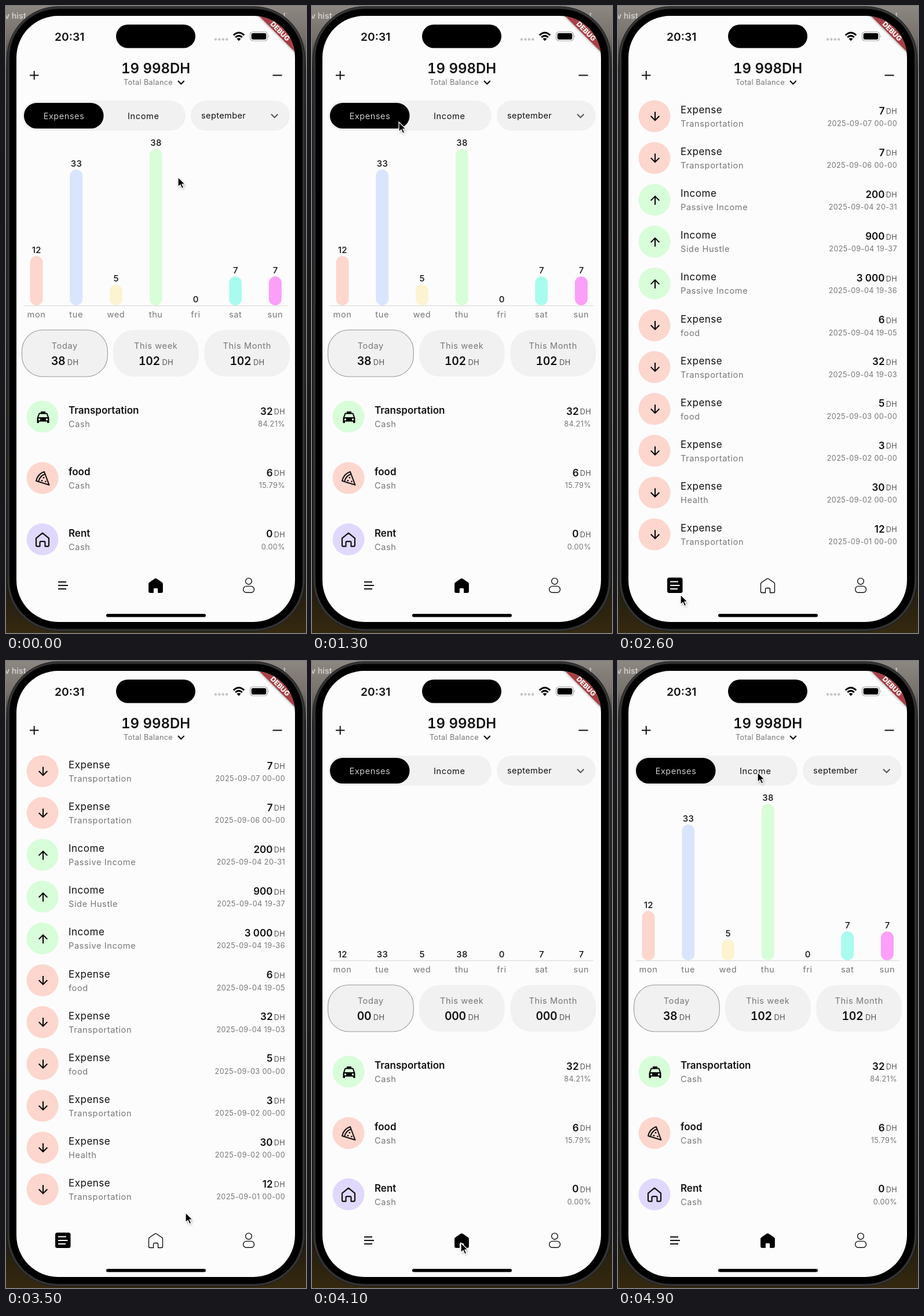
These frames come from a looping animation (518 px wide and 1081 px high, 5000 ms). An HTML page:

```html
<!DOCTYPE html>
<html lang="en">
<head>
<meta charset="utf-8">
<title>Budget app</title>
<style>
html, body { margin: 0; width: 100%; height: 100%; overflow: hidden; background: #1c1a18; }
svg { display: block; width: 100%; height: 100%; font-family: Inter, Roboto, sans-serif; }
text { white-space: pre; }
.line { fill: none; stroke: #111; stroke-width: 2; stroke-linejoin: round; }
.tab { font-variant-numeric: tabular-nums; }
</style>
</head>
<body>
<svg viewBox="0 0 518 1081">
  <defs>
    <linearGradient id="back" x2="0" y2="1">
      <stop offset="0" stop-color="#8d8782"/>
      <stop offset=".05" stop-color="#77706b"/>
      <stop offset=".1" stop-color="#2b2826"/>
      <stop offset=".9" stop-color="#1b1912"/>
      <stop offset="1" stop-color="#35290f"/>
    </linearGradient>
    <clipPath id="screen"><rect x="18" y="17" width="481" height="1045" rx="72"/></clipPath>
    <filter id="soft" x="-50%" y="-50%" width="200%" height="200%"><feGaussianBlur stdDeviation="2"/></filter>
  </defs>
  <rect width="518" height="1081" fill="url(#back)"/>
  <text x="-2" y="22" font-size="14" font-weight="600" fill="#d2cdca">v hist</text>
  <text x="479" y="21" font-size="13" fill="#d2cdca">t</text>
  <rect x="2" y="1" width="514" height="1077" rx="88" fill="#353535" stroke="#191919"/>
  <rect x="6" y="5" width="506" height="1069" rx="84" stroke="#151515"/>
  <g clip-path="url(#screen)">
    <rect x="18" y="17" width="481" height="1045" fill="#fcfcfc"/>
    <g id="header"></g>
    <g id="home"></g>
    <g id="history"></g>
    <rect x="173" y="1048" width="172" height="5.4" rx="2.7"/>
    <g transform="translate(473.5 43.5) rotate(45)">
      <rect x="-49" y="-7.2" width="98" height="14.4" opacity=".5" filter="url(#soft)"/>
      <rect x="-49" y="-7.2" width="98" height="14.4" fill="#a93f44"/>
      <text y="4.4" text-anchor="middle" font-size="12" font-weight="800" fill="#fff">DEBUG</text>
    </g>
  </g>
  <g id="cursor">
    <path d="M0 0V17L4 13.3 6.8 19.6 9.8 18.3 7 12.2H12.4Z" opacity=".35" transform="translate(1 2)" filter="url(#soft)"/>
    <path d="M0 0V17L4 13.3 6.8 19.6 9.8 18.3 7 12.2H12.4Z" stroke="#fff" stroke-width="1.3"/>
  </g>
</svg>
<script>
const $ = id => document.getElementById(id);
const GRAY = '#777', DARK = '#111', SOFT = '#f1f1f1';
const RED = '#fdd6cd', GREEN = '#d8fdd9', LILAC = '#e1d8fd';

// o: fill, weight, spacing, anchor, extra attributes
const text = (s, x, y, size, o = {}) =>
  `<text x="${x}" y="${y}" font-size="${size}" fill="${o.fill || DARK}" font-weight="${o.weight || 400}"
    letter-spacing="${o.ls ?? 0.6}" text-anchor="${o.anchor || 'start'}" ${o.more || ''}>${s}</text>`;
const mid = (s, x, y, size, o) => text(s, x, y, size, { ...o, anchor: 'middle' });
const end = (s, x, y, size, o) => text(s, x, y, size, { ...o, anchor: 'end' });
const box = (x, y, w, h, r, fill, more = '') =>
  `<rect x="${x}" y="${y}" width="${w}" height="${h}" rx="${r}" fill="${fill}" ${more}/>`;
const line = (d, more = '') => `<path class="line" d="${d}" ${more}/>`;
const at = (x, y, s) => `<g transform="translate(${x} ${y})">${s}</g>`;

const arrow = 'M8 0L6.6-1.4 1 4.2V-8H-1V4.2L-6.6-1.4-8 0 0 8Z';
const icons = {
  down: `<path d="${arrow}"/>`,
  up: `<path d="${arrow}" transform="scale(1 -1)"/>`,
  taxi: `<path fill-rule="evenodd" d="M-4-9.5H4V-7H6Q7.3-7 7.8-5.6L10.5 2V9.5Q10.5 10.5 9.5 10.5H8Q7 10.5 7 9.5V8H-7V9.5Q-7 10.5-8 10.5H-9.5Q-10.5 10.5-10.5 9.5V2L-7.8-5.6Q-7.3-7-6-7H-4ZM-6-5L-7.8 0.4H7.8L6-5ZM-6.5 2.6a1.7 1.7 0 1 0 .01 0M6.5 2.6a1.7 1.7 0 1 0 .01 0"/>`,
  pizza: line('M-12 4.5Q-9-8 2-11.3L10.5 11.5ZM-8 5.6Q-5.5-4.5 3.6-7.3') +
    '<circle cx="1" cy="-1" r="1.3"/><circle cx="4.5" cy="5.5" r="1.3"/><circle cx="-2" cy="4" r="1.3"/>',
  house: line('M-12-2.5L-1-11.5 10-2.5V9.5Q10 11.5 8 11.5H3.5V5Q3.5 3 1.5 3H-3.5Q-5.5 3-5.5 5V11.5H-10Q-12 11.5-12 9.5Z', 'style="stroke-width:2.2"')
};

function row(y, icon, color, title, sub, amount, note, bold) {
  return `<circle cx="63" cy="${y}" r="27.5" fill="${color}"/>` + at(64, y + .5, icons[icon]) +
    text(title, 108, y - 5, 17, bold ? { weight: 600, ls: 0 } : { ls: .5 }) +
    text(sub, 108, y + 18, 14.6, { fill: GRAY }) +
    end(amount, 460.5, y - 3.3, 17, { weight: 600, ls: 0 }) +
    end('DH', 482, y - 3.8, 12.7, { fill: '#555', ls: .35 }) +
    end(note, 482, y + 17, 12.7, { fill: GRAY, ls: .35 });
}

const homePath = 'M-12-3.2Q-12-4.6-10.8-5.6L-1.6-11.8Q0-12.8 1.6-11.8L10.8-5.6Q12-4.6 12-3.2V10Q12 12 10 12H4V6Q4 4 2 4H-2Q-4 4-4 6V12H-10Q-12 12-12 10Z';
function nav(listOpen) {
  return (listOpen
    ? box(85, 985.5, 26.5, 26.5, 3.5, '#000') + line('M90 992.5H104M90 999H106.5M90 1005H103', 'style="stroke:#fff"')
    : line('M90 993H104M90 999H107M90 1005H104')) +
    at(258.5, 999.5, `<path d="${homePath}" fill="${listOpen ? 'none' : '#000'}" stroke="#000" stroke-width="${listOpen ? 1.3 : .8}"/>`) +
    '<g fill="none" stroke="#111" stroke-width="1.4"><circle cx="419" cy="991.8" r="5.4"/>' +
    '<rect x="409.7" y="1000.4" width="18.8" height="10.8" rx="5.2"/></g>';
}

$('header').innerHTML =
  text('20:31', 84, 59.8, 19.3, { weight: 600, ls: 0 }) +
  box(190, 32, 137, 40.5, 20.2, '#000') +
  [0, 1, 2, 3].map(i => `<circle cx="${362 + i * 6.4}" cy="57.5" r="2.2" fill="#c4c4c4"/>`).join('') +
  '<g fill="none" stroke="#000" stroke-width="3"><path d="M392.8 50.3Q402 41.7 411.2 50.3M396.2 54Q402 48.8 407.8 54"/></g>' +
  '<path d="M398.5 56.6Q402 53.8 405.5 56.6L402 60.2Z"/>' +
  box(421.5, 44.5, 30, 15.5, 5, 'none', 'stroke="#a5a5a5" stroke-width="1.2"') +
  box(423.7, 46.7, 25.6, 11.1, 3, '#000') +
  '<path d="M453 50Q455 52.2 453 54.5Z" fill="#a5a5a5"/>' +
  line('M41 119.5H56.5M48.7 112V127M460.5 119.5H476.5') +
  mid('19 998DH', 258.6, 115.7, 24, { weight: 600, ls: 0, more: 'class="tab"' }) +
  text('Total Balance', 203, 136.3, 12.7, { fill: GRAY, ls: .35 }) +
  line('M297 129L302.3 134.5 307.7 129', 'style="stroke-width:2.2"');

const month = '2025-09-';
const entries = [
  ['Transportation', '7', '07 00-00'], ['Transportation', '7', '06 00-00'],
  ['Passive Income', '200', '04 20-31', 1], ['Side Hustle', '900', '04 19-37', 1],
  ['Passive Income', '3 000', '04 19-36', 1], ['food', '6', '04 19-05'],
  ['Transportation', '32', '04 19-03'], ['food', '5', '03 00-00'],
  ['Transportation', '3', '02 00-00'], ['Health', '30', '02 00-00'],
  ['Transportation', '12', '01 00-00']
];
$('history').innerHTML = nav(true) + entries.map(([sub, amount, when, income], i) =>
  row(190 + i * 72.1, income ? 'up' : 'down', income ? GREEN : RED,
    income ? 'Income' : 'Expense', sub, amount, month + when)).join('');

const days = [
  ['mon', 12, RED], ['tue', 33, '#d9e5ff'], ['wed', 5, '#fcf3cf'], ['thu', 38, GREEN],
  ['fri', 0, 'none'], ['sat', 7, '#a9fbee'], ['sun', 7, '#fb9ff9']
];
const totals = [['Today', 38, 101.3], ['This week', 102, 258.7], ['This Month', 102, 416.2]];
const dayX = i => 52.5 + i * 68.73;

const homeStatic =
  box(28, 163, 282, 52, 26, SOFT) + box(31, 167, 137.5, 44.3, 22, '#000') +
  mid('Expenses', 100, 194.8, 14.6, { fill: '#fff', weight: 300 }) + mid('Income', 237.3, 194.8, 14.6) +
  box(319, 163, 171, 52, 26, SOFT) + text('september', 337, 194, 14.6, { ls: .35 }) +
  line('M458 186.5L463.7 192.3 469.4 186.5', 'style="stroke:#555"') +
  line('M31 516.6H486', 'style="stroke:#dcdcdc;stroke-width:1.2"') +
  days.map(([name], i) => mid(name, dayX(i), 537, 14.6, { fill: GRAY })).join('') +
  totals.map(([name, , x], i) =>
    box(x - 73.8, 558.5, 147.8, 80.5, 36, SOFT, i ? '' : 'stroke="#999" stroke-width="1.1"') +
    mid(name, x, 590.8, 14.6, { fill: GRAY })).join('') +
  row(708, 'taxi', GREEN, 'Transportation', 'Cash', '32', '84.21%', true) +
  row(813.8, 'pizza', RED, 'food', 'Cash', '6', '15.79%', true) +
  row(919.6, 'house', LILAC, 'Rent', 'Cash', '0', '0.00%', true) + nav(false);

// Each place rolls from 0 to its own share of the number
function counter(value, x, p) {
  const n = String(value).length, pitch = 12.3, left = x - (n * pitch + 22.5) / 2;
  let out = text('DH', left + n * pitch + 3.5, 619, 13, { fill: '#555', ls: .35 });
  for (let i = 0; i < n; i++) {
    const v = Math.floor(value / 10 ** (n - 1 - i)) * p, whole = Math.floor(v), part = v - whole;
    const digit = (d, shift, alpha) => alpha > 0 ? mid(d % 10, left + pitch * (i + .5), 619 + shift, 19.4,
      { weight: 600, ls: 0, more: `class="tab" opacity="${alpha}"` }) : '';
    out += digit(whole, -23 * part, 1 - part) + digit(whole + 1, 23 * (1 - part), part);
  }
  return out;
}

function drawHome(p) {
  $('home').innerHTML = homeStatic + days.map(([, value, color], i) => {
    const h = value * 7.09 * p, x = dayX(i);
    return box(x - 11, 516 - h, 22, h, Math.min(11, h / 2), color) +
      mid(value, x + .3, 510.6 - h, 15, { weight: 500, ls: .4 });
  }).join('') + totals.map(([, value, x]) => counter(value, x, p)).join('');
}

const path = [
  [0, 297, 295], [500, 260, 560], [700, 260, 560], [1300, 150, 200], [1900, 235, 500],
  [2400, 108, 1015], [2900, 108, 1015], [3200, 322, 212], [3500, 310, 951], [3700, 325, 874],
  [3900, 257, 1003], [4100, 257, 1003], [4600, 392, 598], [4900, 241, 192], [5000, 241, 192]
];
function cursorAt(t) {
  const i = path.findIndex(k => k[0] > t), [t0, x0, y0] = path[i - 1], [t1, x1, y1] = path[i];
  const u = (t - t0) / (t1 - t0), e = u * u * (3 - 2 * u);
  return [x0 + (x1 - x0) * e, y0 + (y1 - y0) * e];
}

let start, last = -1;
function frame(now) {
  start ??= now;
  const t = Math.floor((now - start) % 5000 / 100) * 100; // ten pictures a second
  if (t !== last) {
    last = t;
    const listOpen = t >= 2600 && t < 4100;
    $('history').style.display = listOpen ? '' : 'none';
    $('home').style.display = listOpen ? 'none' : '';
    if (!listOpen) drawHome(t < 4100 ? 1 : Math.min(1, (t - 4100) / 500));
    $('cursor').setAttribute('transform', `translate(${cursorAt(t)})`);
  }
  requestAnimationFrame(frame);
}
frame(performance.now());
</script>
</body>
</html>
```
